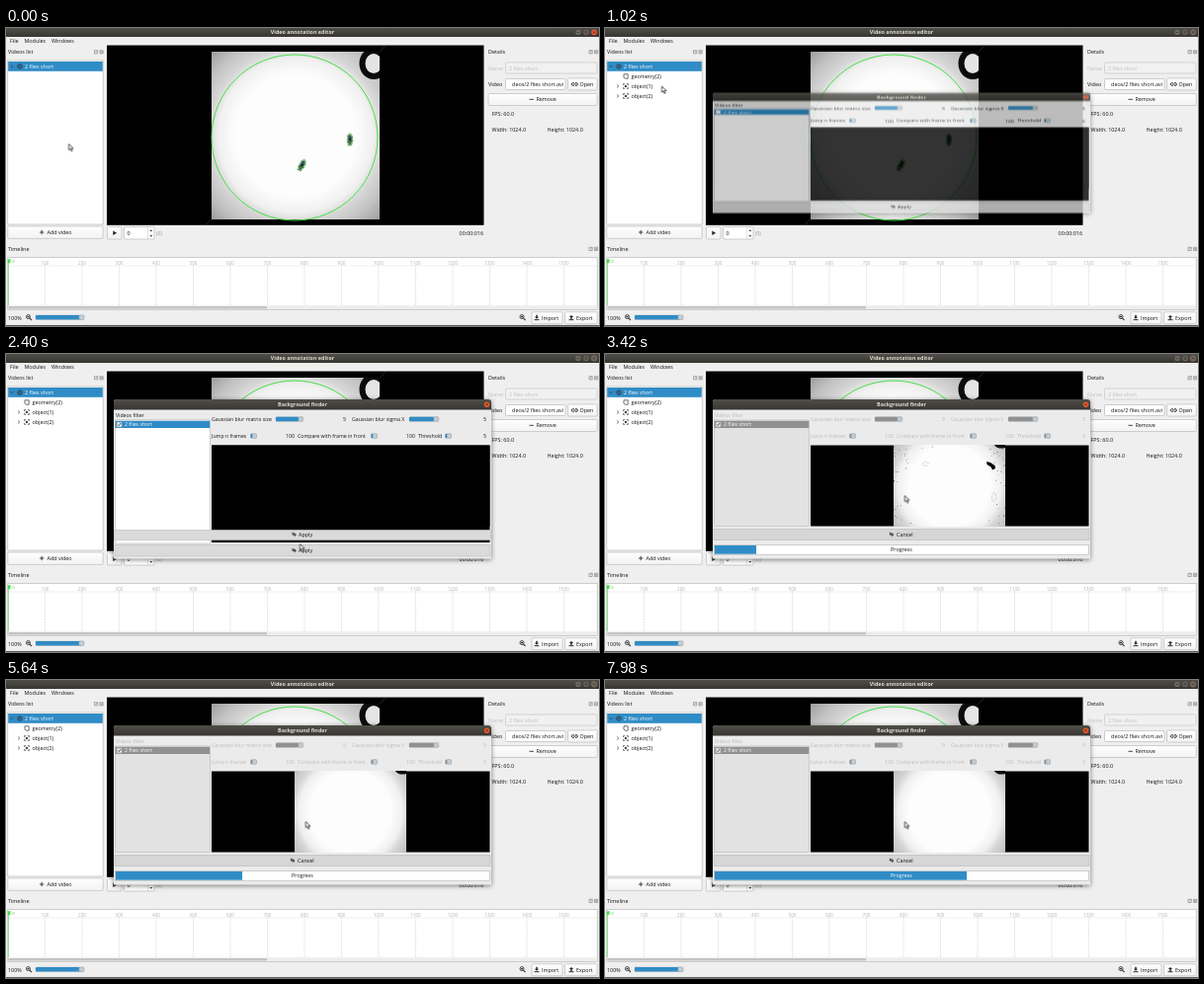
An HTML page that plays this animation: 600 px wide and 302 px high, repeating every 8 s.

```html
<!DOCTYPE html>
<html lang="en">
<head>
<meta charset="utf-8">
<title>Video annotation editor</title>
<style>
html, body { margin: 0; width: 100%; height: 100%; overflow: hidden; background: #efefef; }
svg { display: block; width: 600px; height: 302px; }
text { font: 500 5.4px "Open Sans", sans-serif; fill: #141414; dominant-baseline: central; white-space: pre; }
.m { text-anchor: middle; }
.e { text-anchor: end; }
.b { font-weight: 700; fill: #dfdbd2; }
.w { fill: #fff; }
.dim { fill: #c0c0c0; }
.num { font-size: 4.6px; fill: #b4b4b4; }
.btn { fill: url(#btn); stroke: #bdbdbd; stroke-width: .7; }
.box { fill: #fff; stroke: #b9b9b9; stroke-width: .7; }
.ln { fill: none; stroke: #333; stroke-width: .9; }
.hi { fill: #308cc6; }
.slot { fill: #d2d2d2; stroke: #aaa; stroke-width: .4; }
.knob { fill: #c3cdd5; stroke: #9aa5ad; stroke-width: .5; }

/* every part shares one 8 s clock */
.tree, .fold, .check, .ghost, .idle, .busy, .form, .shot, .blur { animation: 8s infinite step-end; }
.tree { animation-name: after360; }
.fold { animation-name: until360; }
.blur { animation-name: after960; }
.check { animation-name: after1500; }
.ghost { animation-name: after2340; }
.idle { animation-name: until2520; }
.busy { animation-name: after2520; }
.shot { animation-name: after2640; }
.form { animation-name: disable; --ink: #141414; --hi: #308cc6; --base: #fff; }
.form text { fill: var(--ink); font-size: 5.2px; }
.form text.w { fill: #fff; }
.form .hi { fill: var(--hi); }
.form .base { fill: var(--base); stroke: #b9b9b9; stroke-width: .6; }
.dlg { transform-origin: 300px 126.5px; animation: open 8s infinite linear; }
.pane { filter: drop-shadow(0 1px 2.5px rgba(0, 0, 0, .5)); }
.noise { animation: settle 8s infinite linear; }
.bar { animation: progress 8s infinite linear; }
.cur { animation: move 8s infinite ease-in-out; }

@keyframes after360 { 0% { opacity: 0 } 4.5%, 100% { opacity: 1 } }
@keyframes until360 { 0% { opacity: 1 } 4.5%, 100% { opacity: 0 } }
@keyframes after960 { 0% { opacity: 0 } 12%, 100% { opacity: 1 } }
@keyframes after1500 { 0% { opacity: 0 } 18.75%, 100% { opacity: 1 } }
@keyframes after2340 { 0% { opacity: 0 } 29.25%, 100% { opacity: 1 } }
@keyframes until2520 { 0% { opacity: 1 } 31.5%, 100% { opacity: 0 } }
@keyframes after2520 { 0% { opacity: 0 } 31.5%, 100% { opacity: 1 } }
@keyframes after2640 { 0% { opacity: 0 } 33%, 100% { opacity: 1 } }
@keyframes disable {
  0% { --ink: #141414; --hi: #308cc6; --base: #fff }
  31.5%, 100% { --ink: #bcbcbc; --hi: #919191; --base: #e2e2e2 }
}
@keyframes open {
  0%, 11.99% { opacity: 0; transform: scaleY(.62) }
  12% { opacity: .45; transform: scaleY(.62) }
  12.75% { opacity: .8; transform: scaleY(.75) }
  14.25%, 100% { opacity: 1; transform: none }
}
@keyframes settle { 0%, 42.75% { opacity: 1 } 51.75% { opacity: .35 } 55.5% { opacity: .3 } 57.75%, 100% { opacity: 0 } }
@keyframes progress {
  0%, 31.5% { width: 0 } 42.75% { width: 42px } 51.75%, 55.5% { width: 64px }
  57.75%, 60.75% { width: 74px } 70.5% { width: 128px } 72.75% { width: 136px }
  81.75%, 82.5% { width: 202px } 88.5%, 90.75% { width: 234px } 94.5%, 100% { width: 255px }
}
@keyframes move {
  0% { transform: translate(63.5px, 117.5px) }
  4%, 5% { transform: translate(6px, 39px) }
  8%, 8.75% { transform: translate(30px, 14px) }
  11.75%, 13.5% { transform: translate(57.5px, 59px) }
  18.25%, 20.5% { transform: translate(114px, 71px) }
  28.5%, 31.5% { transform: translate(297.5px, 192.5px) }
  37.5%, 100% { transform: translate(303.3px, 143.5px) }
}
</style>
</head>
<body>
<svg viewBox="0 0 600 302">
<defs>
  <linearGradient id="cap" x2="0" y2="1"><stop stop-color="#504e49"/><stop offset="1" stop-color="#373632"/></linearGradient>
  <linearGradient id="btn" x2="0" y2="1"><stop stop-color="#fefefe"/><stop offset="1" stop-color="#f3f3f3"/></linearGradient>
  <radialGradient id="lamp" cx=".5" cy=".5" r=".72">
    <stop offset=".5" stop-color="#fdfdfd"/><stop offset=".64" stop-color="#f0f0f0"/>
    <stop offset=".72" stop-color="#d6d6d6"/><stop offset=".85" stop-color="#c0c0c0"/><stop offset="1" stop-color="#979797"/>
  </radialGradient>
  <clipPath id="sq"><rect width="170" height="170"/></clipPath>
  <clipPath id="view"><rect x="292" y="92.5" width="113" height="82"/></clipPath>
  <clipPath id="field"><rect x="509" y="52" width="57" height="10"/></clipPath>
  <clipPath id="done"><rect class="bar" x="111" y="193" height="11"/></clipPath>
  <g id="arena" clip-path="url(#sq)">
    <rect width="170" height="170" fill="url(#lamp)"/>
    <ellipse cx="164" cy="12" rx="11.5" ry="13" fill="#e4e4e4" stroke="#0c0c0c" stroke-width="6"/>
  </g>
  <g id="fly">
    <ellipse rx="2.8" ry="6.2" fill="#9bc79b" stroke="#4bc04b" stroke-width=".6"/>
    <ellipse rx="1.7" ry="4.6" fill="#26332c"/>
    <path d="M-3.2-4L3-2M-3.2 3L3.2 1M-2.6 6L2.4 5" stroke="#3a5a44" stroke-width=".6"/>
    <circle cy="-2.4" r=".9" fill="#3d62b8"/><circle cy="2.4" r=".8" fill="#49b849"/>
  </g>
  <path id="dock" d="M0 0h3.2v3.2h-3.2zM1.3 2L3.2 0M5.5 0h3.2v3.2h-3.2zM6.2.6l1.9 2M8.1.6l-1.9 2" fill="none" stroke="#777" stroke-width=".6"/>
  <g id="zoom" class="ln"><circle r="2"/><path d="M1.5 1.5L3.5 3.5M-1 0h2" stroke-width="1.2"/></g>
  <g id="focus" class="ln" style="stroke-width:.7">
    <path d="M-2.4-1v-1.4h1.4M1-2.4h1.4v1.4M2.4 1v1.4h-1.4M-1 2.4h-1.4v-1.4"/><circle r=".9" fill="#333"/>
  </g>
  <path id="tap" class="ln" d="M-1.6-2v2.4h3M-.2-1.6v2M.2-1.2L2 .4L.2 2"/>
  <path id="more" class="ln" d="M-.8-1.5L.8 0L-.8 1.5" style="stroke-width:.7"/>
  <path id="arrow" d="M-.7-2.8h1.4v2h1.4L0 1.3L-2.1-.8h1.400z" fill="#222"/>
  <path id="tray" d="M-2.4 1.7h4.8v1h-4.8z" fill="#222"/>
  <g id="close"><circle r="2.8" fill="#e2592f"/><path d="M-1-1l2 2m0-2l-2 2" stroke="#4a1c0d" stroke-width=".7"/></g>
</defs>

<!-- window frame and menu -->
<rect width="600" height="302" fill="#efefef"/>
<rect y="301.2" width="600" height=".8" fill="#3c3b37"/>
<rect width="600" height="9" fill="url(#cap)"/>
<text class="m b" x="300" y="4.2">Video annotation editor</text>
<circle cx="579" cy="4.4" r="2.7" fill="#6d6a63"/><path d="M577.7 4.6h2.6" stroke="#2f2e2a" stroke-width=".7"/>
<circle cx="587" cy="4.4" r="2.7" fill="#6d6a63"/><path d="M586 3.4h2v2h-2z" fill="none" stroke="#2f2e2a" stroke-width=".6"/>
<use href="#close" x="595" y="4.4"/>
<g class="blur">
  <circle cx="595" cy="4.4" r="2.9" fill="#6d6a63"/><path d="M594 3.4l2 2m0-2l-2 2" stroke="#2f2e2a" stroke-width=".7"/>
</g>
<text x="4" y="13">File</text><text x="18.5" y="13">Modules</text><text x="46" y="13">Windows</text>

<!-- videos list -->
<text x="2" y="24.3">Videos list</text><use href="#dock" x="89.5" y="22.7"/>
<rect class="box" x="1.8" y="33" width="96.4" height="166"/>
<rect class="hi" x="2.2" y="34" width="95.6" height="9.8"/>
<g class="fold"><use href="#more" x="6" y="39"/></g>
<circle class="ln" cx="14" cy="39" r="2.2"/><circle cx="14" cy="39" r=".8" fill="#333"/>
<text class="w" x="19" y="39">2 flies short</text>
<g class="tree">
  <path class="ln" d="M4.6 38.3L6 39.7L7.4 38.3" style="stroke-width:.7"/>
  <path class="ln" d="M19 46.8h4.2v4.4h-3l-1.2-1.2z" style="stroke-width:.7"/>
  <text x="26.5" y="49">geometry(2)</text>
  <use href="#more" x="13" y="59"/><use href="#focus" x="21" y="59"/><text x="26.5" y="59">object(1)</text>
  <use href="#more" x="13" y="69"/><use href="#focus" x="21" y="69"/><text x="26.5" y="69">object(2)</text>
</g>
<rect class="btn" x="1.8" y="201" width="96.4" height="12.4" rx="1"/>
<path class="ln" d="M34 207h4.4M36.2 204.8v4.4"/><text x="41.5" y="207">Add video</text>

<!-- player -->
<rect x="102" y="17.5" width="381.5" height="182.3" fill="#000"/>
<path d="M208 194l-6 5.5M378 24l6-6" stroke="#444" stroke-width=".5"/>
<use href="#arena" x="208" y="24"/>
<circle cx="292" cy="111" r="84" fill="none" stroke="#45e045"/>
<use href="#fly" transform="translate(348 113)"/>
<use href="#fly" transform="translate(299.5 139) rotate(28)"/>
<rect class="btn" x="102.5" y="201.5" width="14.5" height="12.5" rx="1"/>
<path d="M108.3 205.5v4.6l3.8-2.3z" fill="#222"/>
<rect class="box" x="119.5" y="201.5" width="30.5" height="12.5" rx="1"/>
<path d="M143.5 201.5v12.5" stroke="#ccc" stroke-width=".6"/>
<path d="M145.3 206l1.5-1.8l1.5 1.8zM145.3 210l1.5 1.8l1.5-1.8z" fill="#444"/>
<text x="122.5" y="208">0</text><text x="152" y="208" style="fill:#999;font-size:5px">(0)</text>
<text class="e" x="483" y="208">00:00:016</text>

<!-- details -->
<text x="488" y="24.3">Details</text><use href="#dock" x="590" y="22.7"/>
<text class="dim" x="488" y="40.5">Name</text>
<rect x="505.5" y="35" width="92.5" height="11" rx="1" fill="#f1f1f1" stroke="#c8c8c8" stroke-width=".7"/>
<text class="dim" x="509" y="40.5">2 flies short</text>
<text x="488" y="57">Video</text>
<rect class="box" x="505.5" y="51.5" width="60.5" height="11" rx="1"/>
<g clip-path="url(#field)"><text class="e" x="564" y="57">deos/2 flies short.avi</text></g>
<rect class="btn" x="568.5" y="51" width="29.7" height="12" rx="1"/>
<path class="ln" d="M574.8 55.6h-1a1.4 1.4 0 0 0 0 2.8h1M576 55.6h1a1.4 1.4 0 0 1 0 2.8h-1M574 57h2.8"/>
<text x="580.5" y="57">Open</text>
<rect class="btn" x="488" y="66.5" width="110.2" height="12" rx="1"/>
<path class="ln" d="M529.5 72.3h4.4"/><text x="536.5" y="72.3">Remove</text>
<text x="491.5" y="87">FPS: 60.0</text>
<text x="491.5" y="103">Width: 1024.0</text><text x="547.5" y="103">Height: 1024.0</text>

<!-- timeline -->
<text x="2" y="224">Timeline</text><use href="#dock" x="590" y="222.3"/>
<rect class="box" x="1.8" y="232.5" width="596.4" height="53"/>
<path d="M2 241h596M2 281.3h596" stroke="#e4e4e4" stroke-width=".6"/>
<g id="ruler"></g>
<rect x="2.2" y="282" width="595.6" height="3" fill="#ededed"/>
<rect x="2.2" y="282" width="262" height="2.6" rx="1" fill="#c4c4c4"/>
<path d="M2.5 235v46" stroke="#3fdc3f" stroke-width=".6"/>
<path d="M1.8 234.2h2.8l-.6 4h-2.2z" fill="#3fdc3f"/>
<text x="4.6" y="236.5" style="font-size:4px;fill:#8c8">00</text>
<text x="2" y="294">100%</text><use href="#zoom" x="22.5" y="292.6"/>
<rect class="slot" x="30" y="291" width="49" height="4.6" rx="1"/>
<rect class="hi" x="30" y="291" width="46" height="4.6" rx="1"/>
<rect class="knob" x="74" y="291" width="4.8" height="4.6" rx="1"/>
<use href="#zoom" x="522" y="292.6"/>
<rect class="btn" x="532" y="287.8" width="31" height="12" rx="1"/>
<use href="#arrow" x="537" y="293.5"/><use href="#tray" x="537" y="293.5"/><text x="542" y="294">Import</text>
<rect class="btn" x="565.5" y="287.8" width="32.7" height="12" rx="1"/>
<use href="#arrow" transform="translate(572 292.2) scale(1 -1)"/><use href="#tray" x="572" y="293.5"/><text x="577" y="294">Export</text>

<!-- dialog -->
<g class="dlg">
  <path class="pane" d="M109 207.5V49a3 3 0 0 1 3-3h376a3 3 0 0 1 3 3v158.5z" fill="#ebebeb"/>
  <path d="M109 56.5V49a3 3 0 0 1 3-3h376a3 3 0 0 1 3 3v7.5z" fill="url(#cap)"/>
  <text class="m b" x="300" y="51.3">Background finder</text>
  <use href="#close" x="486.5" y="51.3"/>
  <g class="form">
    <text x="111" y="62">Videos filter</text>
    <rect class="base" x="110.3" y="67" width="96.2" height="107.5"/>
    <g class="idle"><rect class="base" x="110.3" y="67" width="96.2" height="125"/></g>
    <rect class="hi" x="110.6" y="67.8" width="95.6" height="7.2"/>
    <rect class="box" x="112.3" y="69.2" width="4.6" height="4.6"/>
    <path class="ln check" d="M113.3 71.5l1 1.2l1.7-2.7"/>
    <text class="w" x="120" y="71.4">2 flies short</text>
    <g id="params"></g>
  </g>
  <rect x="208" y="92.5" width="281.5" height="82" fill="#000"/>
  <g class="idle">
    <rect x="208" y="92.5" width="281.5" height="98.5" fill="#000"/>
    <rect x="110" y="193.3" width="380" height="11.7" fill="#dadada" stroke="#bbb" stroke-width=".6"/>
    <use href="#tap" x="291.5" y="199"/><text x="296" y="199.3">Apply</text>
    <g class="ghost">
      <rect x="109.5" y="178.3" width="381" height="10.2" fill="#dadada" stroke="#bbb" stroke-width=".6"/>
      <use href="#tap" x="291.5" y="182.8"/><text x="296" y="183.2">Apply</text>
    </g>
  </g>
  <g class="busy">
    <g class="shot" clip-path="url(#view)">
      <use href="#arena" transform="translate(292 77) scale(.665)"/>
      <g class="noise" id="noise">
        <path d="M386 109l4 1l4.5 3l.5 3l-3 1.5l-1.5-3l-4-2.5z" fill="#0a0a0a"/>
        <g fill="none" stroke="#888" stroke-width=".7" stroke-dasharray=".8 1.3">
          <ellipse cx="324.5" cy="111.5" rx="2.6" ry="2"/><ellipse cx="393.5" cy="145" rx="2" ry="4.5"/>
        </g>
      </g>
    </g>
    <rect x="110" y="177.3" width="380" height="11.2" fill="#d6d6d6" stroke="#b8b8b8" stroke-width=".6"/>
    <use href="#tap" x="290" y="182.8"/><text x="295" y="183.2">Cancel</text>
    <rect class="box" x="110.5" y="193.5" width="379" height="9.7"/>
    <text class="m" x="300" y="198.4">Progress</text>
    <rect class="bar hi" x="111" y="194" height="8.7"/>
    <g clip-path="url(#done)"><text class="m w" x="300" y="198.4">Progress</text></g>
  </g>
</g>

<path class="cur" d="M0 0v6.200l1.5-1.3l1.1 2.5l1.1-.5l-1.1-2.4h2z" fill="#fff" stroke="#111" stroke-width=".7"/>
</svg>
<script>
const add = (id, html) => document.getElementById(id).insertAdjacentHTML('beforeend', html);

for (let i = 1; i <= 15; i++) {
  const x = 2 + i * 37.5;
  add('ruler', `<text class="m num" x="${x}" y="237.5">${i * 100}</text>
    <path d="M${x} 240v41" stroke="#d8d8d8" stroke-width=".7" stroke-dasharray="2 .8"/>`);
}

// label x, label, slider x, slider length, filled length, value, value right edge, row y
function param(x, label, sx, len, fill, value, vx, y) {
  add('params', `<text x="${x}" y="${y}">${label}</text>
    <rect class="slot" x="${sx}" y="${y - 2.3}" width="${len}" height="4.6" rx="1"/>
    <rect class="hi" x="${sx}" y="${y - 2.3}" width="${fill}" height="4.6" rx="1"/>
    <rect class="knob" x="${sx + fill}" y="${y - 2.3}" width="4" height="4.6" rx="1"/>
    <text class="e" x="${vx}" y="${y + .3}">${value}</text>`);
}
param(208, 'Gaussian blur matrix size', 273, 28, 23, 5, 344, 66);
param(350, 'Gaussian blur sigma X', 408, 30, 25, 5, 486, 66);
param(208, 'Jump n frames', 247.5, 6, 2, 100, 292, 83);
param(295, 'Compare with frame in front', 369.5, 6, 2, 100, 414, 83);
param(417, 'Threshold', 444.5, 6, 2, 5, 486, 83);

// grain outside the bright disc of the preview
let seed = 11;
const rnd = () => (seed = seed * 16807 % 2147483647) / 2147483647;
let grain = '';
for (let i = 0; i < 420; i++) {
  const x = 292 + rnd() * 113, y = 92.5 + rnd() * 82, s = .5 + rnd() * .5;
  if (Math.hypot(x - 349, y - 140) > 46 + rnd() * 18) grain += `M${x.toFixed(1)} ${y.toFixed(1)}h${s.toFixed(1)}v.7h-${s.toFixed(1)}z`;
}
add('noise', `<path d="${grain}" fill="#555"/>`);
</script>
</body>
</html>
```
